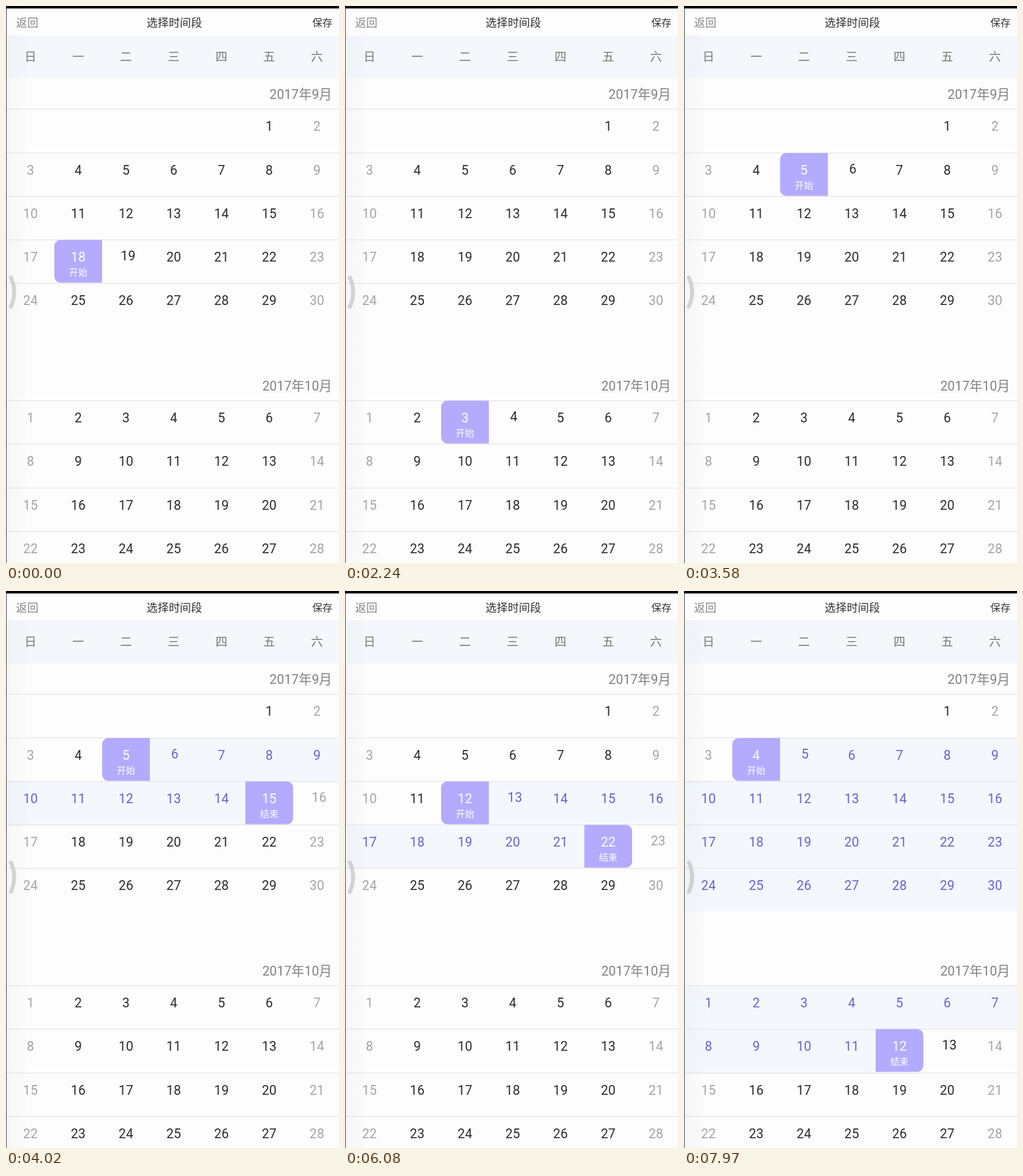
Recreate the animation shown at these times as an HTML page. Size 544 by 911 pixels, loop 8 s.

```html
<!DOCTYPE html>
<html lang="zh-CN">
<head>
<meta charset="utf-8">
<title>选择时间段</title>
<style>
html, body { margin: 0; width: 100%; height: 100%; overflow: hidden; background: #fdfdfd; }
svg { display: block; width: 100%; height: 100%; }
text { font-family: Roboto, "Noto Sans CJK SC", "Noto Sans CJK", sans-serif; }
</style>
</head>
<body>
<svg id="stage" viewBox="0 0 544 911"></svg>
<script>
const LOOP = 8000, COL = 78, ROW = 71.25, SIZE = 21.2;
const PURPLE = '#6c5fd0', BLOCK = '#b4abfe', BAND = '#f4f8fe';
// [time, first day, last day], days counted from 1 September
const STATES = [
  [0, 18], [990, 18, 22], [2240, 33], [2690, 33, 48], [3580, 5], [4020, 5, 15],
  [4740, 28], [5360, 12], [6080, 12, 22], [7250, 4], [7970, 4, 42]
];
const svg = document.getElementById('stage');

function add(tag, attrs, content) {
  const el = document.createElementNS('http://www.w3.org/2000/svg', tag);
  for (const k in attrs) el.setAttribute(k, attrs[k]);
  if (content !== undefined) el.textContent = content;
  svg.appendChild(el);
  return el;
}
const rect = (x, y, width, height, fill) => add('rect', { x, y, width, height, fill });
const label = (s, x, y, size, fill, anchor = 'middle') =>
  add('text', { x, y, 'font-size': size, fill, 'text-anchor': anchor }, s);

function blockPath(x, y, left, right) {
  const w = COL, h = 70, a = left ? 10 : 0, b = right ? 10 : 0;
  return `M${x + a} ${y}H${x + w - b}a${b} ${b} 0 0 1 ${b} ${b}V${y + h - b}a${b} ${b} 0 0 1 ${-b} ${b}` +
    `H${x + a}a${a} ${a} 0 0 1 ${-a} ${-a}V${y + a}a${a} ${a} 0 0 1 ${a} ${-a}Z`;
}

rect(0, 0, 544, 911, '#fdfdfd');
rect(0, 48, 544, 70.5, '#f4f8fd');
const shade = add('linearGradient', { id: 'shade' });
for (const [offset, o] of [[0, 0.03], [0.8, 0.012], [1, 0]]) {
  shade.appendChild(add('stop', { offset, 'stop-color': '#403030', 'stop-opacity': o }));
}

label('返回', 16.6, 33.6, 18.1, '#858585', 'start');
label('选择时间段', 275, 33.6, 18.1, '#303030');
label('保存', 533.3, 32.6, 16.4, '#303030', 'end');
[...'日一二三四五六'].forEach((s, i) => label(s, 40 + COL * i, 90.3, 19.4, '#777'));
label('2017年9月', 532.5, 151.6, SIZE, '#828282', 'end');
label('2017年10月', 532.5, 628.6, SIZE, '#828282', 'end');

const cells = [];
function month(first, count, top, offset, rows) {
  for (let d = 1; d <= count; d++) {
    const slot = d - 1 + first, col = slot % 7, row = Math.floor(slot / 7);
    if (row >= rows) break;
    const x = 1 + COL * col, y = Math.round(top + ROW * row) + 0.5;
    cells.push({
      day: d + offset, x, y, cx: x + 39, base: y + 35, wide: d > 9,
      ink: col % 6 ? '#2c2c2c' : '#a4a4a4', name: d
    });
  }
}
month(5, 30, 168.3, 0, 5);
month(0, 31, 645.1, 30, 4);

for (const c of cells) c.band = rect(c.x, c.y, COL, 71, BAND);
for (const [top, n] of [[168.3, 5], [645.1, 4]]) {
  for (let i = 0; i < n; i++) rect(0, Math.round(top + ROW * i), 544, 1, '#e0e0e1');
}
for (const c of cells) {
  c.block = add('path', { fill: BLOCK });
  c.text = label(c.name, c.cx, c.base, SIZE, c.ink);
  c.note = label('', c.cx, c.y + 58, 15, '#fff');
}

rect(1, 48, 34, 863, 'url(#shade)');
rect(0, 4, 1, 907, '#3d4542');
rect(0, 0, 544, 4, '#000');
add('path', {
  d: 'M8 444Q18.500 468 8 492', fill: 'none', stroke: '#bdbdbd',
  'stroke-opacity': 0.62, 'stroke-width': 6.5, 'stroke-linecap': 'round'
});

function show([, from, to]) {
  for (const c of cells) {
    const start = c.day === from, end = c.day === to, edge = start || end;
    const inside = c.day > from && c.day < to;
    // the day after an edge sits slightly up and to the right
    const moved = c.day === from + 1 || c.day === to + 1;
    const shift = moved && !edge;
    c.band.setAttribute('visibility', inside ? 'visible' : 'hidden');
    c.block.setAttribute('d', edge ? blockPath(c.x, c.y, start, end) : '');
    c.note.textContent = start ? '开始' : end ? '结束' : '';
    c.text.setAttribute('fill', edge ? '#fff' : inside ? PURPLE : c.ink);
    c.text.setAttribute('x', c.cx + (shift ? (c.wide ? 3.5 : 1.8) : 0));
    c.text.setAttribute('y', c.base - (shift ? 1.9 : 0));
  }
}

let current;
function frame(now) {
  const t = now % LOOP;
  const state = STATES.filter(s => s[0] <= t).pop();
  if (state !== current) show(current = state);
  requestAnimationFrame(frame);
}
show(current = STATES[0]);
requestAnimationFrame(frame);
</script>
</body>
</html>
```
